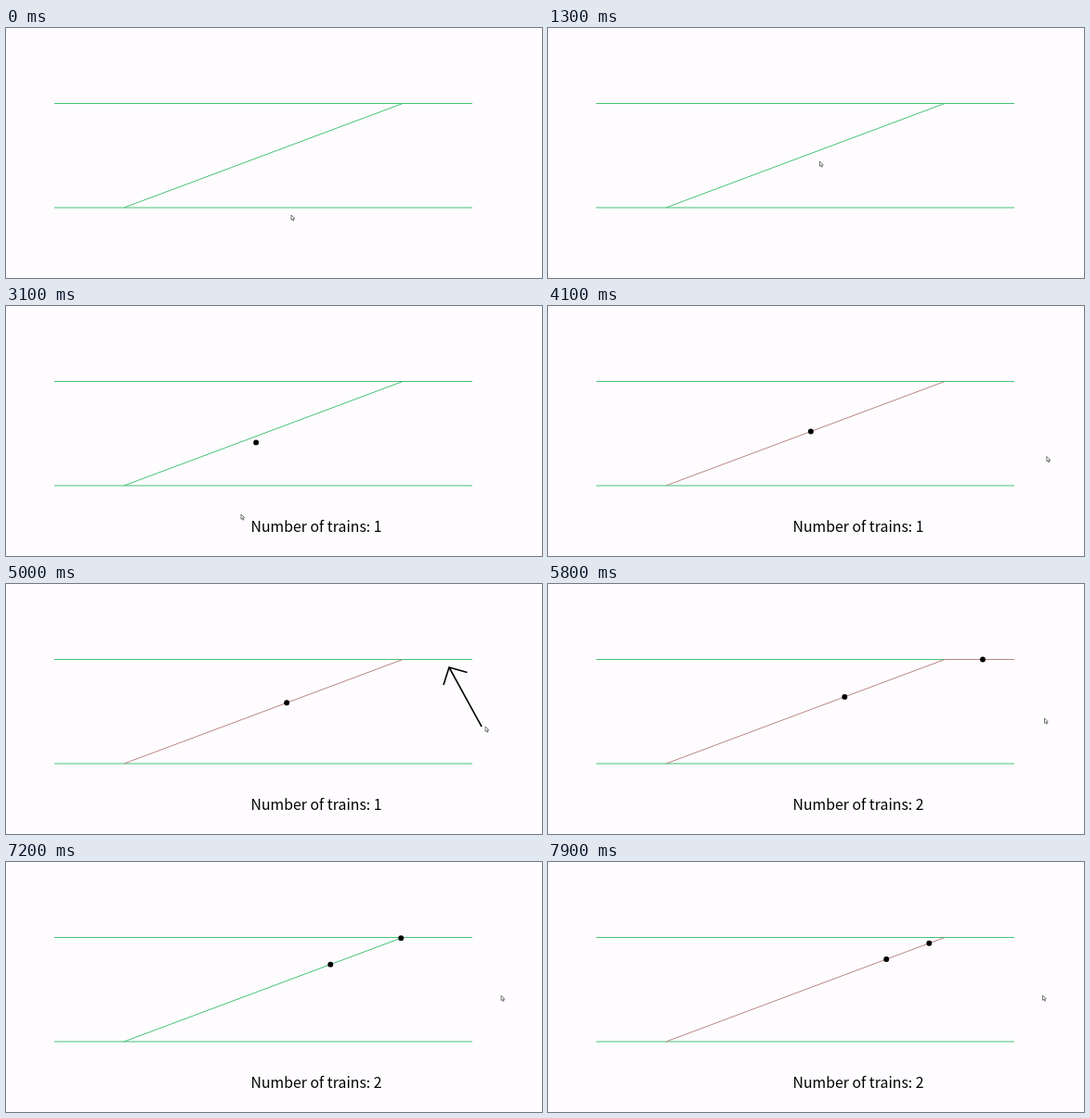
These frames come from a looping animation (577x270 px, 8 s). An HTML page:

```html
<!DOCTYPE html>
<html lang="en">
<head>
<meta charset="utf-8">
<title>Trains</title>
<style>
  html, body { margin: 0; width: 100%; height: 100%; overflow: hidden; background: #fefcff; }
  svg { display: block; }
  text { font: 15.85px "Noto Sans CJK JP", "Noto Sans CJK SC", "Noto Sans CJK", "Noto Sans", sans-serif; }
</style>
</head>
<body>
<svg width="577" height="270" viewBox="0 0 577 270">
  <path d="M52 81.5H427M52 194H502" stroke="#45c274"/>
  <path id="siding" d="M427 81.5H502"/>
  <path id="link" d="M127 194L427 81.5"/>
  <path id="arrow" fill="none" stroke="#000" stroke-width="1.6"/>
  <circle id="train1" r="2.95"/>
  <circle id="train2" r="2.95"/>
  <text id="label" x="263.5" y="244"></text>
  <path id="cursor" d="M0 0V5.3L1.2 4.2L2.1 6.2L3 5.8L2.1 3.9H3.8Z" fill="#fff" stroke="#444" stroke-width=".7"/>
</svg>
<script>
const LOOP = 8000, STEP = 100;
const FIRST = 3100, SNAP = 3300, SECOND = 5400, DEPART = 5800, JOIN = 7120, BLOCKED = 7400;
const SPEED = 0.0214; // horizontal px per ms on the diagonal
const el = id => document.getElementById(id);
const progress = (t, from, to) => Math.min(1, Math.max(0, (t - from) / (to - from)));
const mix = (a, b, p) => a + (b - a) * p;

// Pointer stops: time, x, y
const stops = [
  [0, 307, 202], [500, 425, 120], [900, 198, 205], [1300, 292.5, 144], [1900, 146, 195],
  [2400, 253, 225], [FIRST, 253, 225], [3700, 543, 165], [5000, 516, 154], [DEPART, 534.5, 145], [LOOP, 532.5, 144]
];

function pointer(t) {
  const i = stops.findIndex(s => s[0] > t);
  const [t0, x0, y0] = stops[i - 1], [t1, x1, y1] = stops[i];
  const p = progress(t, t0, t1), ease = p * p * (3 - 2 * p);
  return [mix(x0, x1, ease), mix(y0, y1, ease)];
}

const onLink = x => [x, 194 - (x - 127) * 0.375];

function firstTrain(t) {
  return t < SNAP ? [269.2, 147.4] : onLink(302.2 + (t - 5000) * SPEED);
}

function secondTrain(t) {
  if (t < DEPART) return [468, 83];
  if (t < JOIN) return [mix(468, 427, progress(t, DEPART, JOIN)), 81.5];
  return onLink(427 - (t - JOIN) * SPEED);
}

function arrowPath(t) {
  const p = progress(t, 4500, 4900);
  if (!p || t >= SECOND) return "";
  return `M512 154L${mix(512, 477, p)} ${mix(154, 90, p)}m-6 19l6 -19l19.5 5.5`;
}

function place(id, [x, y], shown = true) {
  el(id).setAttribute("transform", `translate(${x} ${y})`);
  el(id).setAttribute("visibility", shown ? "visible" : "hidden");
}

function signal(id, busy) {
  el(id).setAttribute("stroke", busy ? "#b98781" : "#45c274");
}

function draw(now) {
  const t = Math.floor(now % LOOP / STEP) * STEP;
  signal("siding", t >= DEPART && t < JOIN);
  signal("link", t >= SNAP && t < JOIN || t >= BLOCKED);
  el("arrow").setAttribute("d", arrowPath(t));
  place("train1", firstTrain(t), t >= FIRST);
  place("train2", secondTrain(t), t >= SECOND);
  place("cursor", pointer(t));
  el("label").textContent = t < FIRST ? "" : `Number of trains: ${t < SECOND ? 1 : 2}`;
  requestAnimationFrame(draw);
}
requestAnimationFrame(draw);
</script>
</body>
</html>
```
